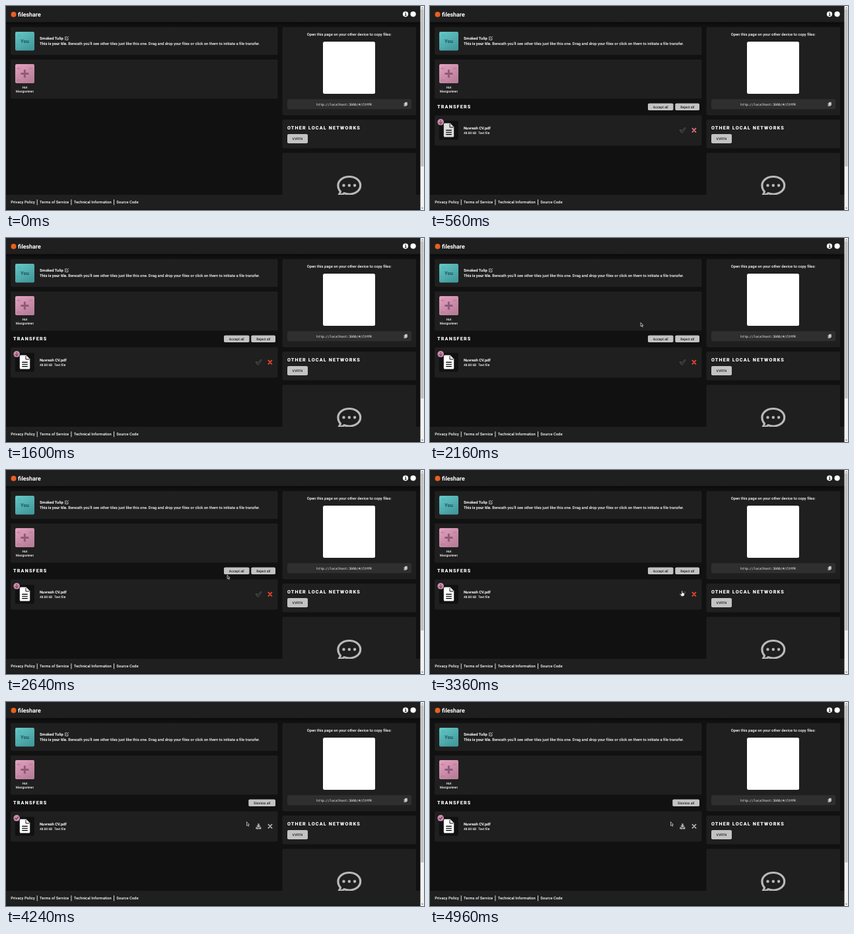
An HTML page that plays this animation: 633 px wide and 309 px high, repeating every 5.04 s.

```html
<!DOCTYPE html>
<html lang="en">
<head>
<meta charset="utf-8">
<title>File transfer</title>
<style>
html, body { margin: 0; width: 100%; height: 100%; overflow: hidden; background: #111; }
svg { display: block; width: 100vw; height: 100vh; }
text { font: 500 5.83px Roboto, sans-serif; fill: #fff; text-rendering: geometricPrecision; }
.b { font-weight: 700; }
.mid { text-anchor: middle; }
.small { font-size: 4.85px; }
.title { font-size: 8.9px; font-weight: 700; }
.head { font-size: 7.2px; font-weight: 900; letter-spacing: 1.18px; }
.btn { font-size: 5.1px; font-weight: 500; fill: #1c1c1c; text-anchor: middle; }
.mono { font: 4.8px "DejaVu Sans Mono", monospace; text-anchor: middle; }
.panel { fill: #1f1f1f; }
.key { fill: #c3c3c3; }
.line { fill: none; stroke-linecap: round; stroke-linejoin: round; }
</style>
</head>
<body>
<svg viewBox="0 0 633 309" preserveAspectRatio="none">
  <defs>
    <linearGradient id="teal" x2="0.6" y2="1"><stop stop-color="#66c9c8"/><stop offset="1" stop-color="#439a9d"/></linearGradient>
    <linearGradient id="pink" x2="0.6" y2="1"><stop stop-color="#e4a3c0"/><stop offset="1" stop-color="#b97e9a"/></linearGradient>
    <linearGradient id="shade" x2="0" y2="1"><stop stop-color="#090909"/><stop offset="1" stop-color="#111"/></linearGradient>
  </defs>

  <rect width="633" height="309" fill="#111"/>
  <rect y="24" width="628" height="6" fill="url(#shade)"/>
  <rect class="panel" width="628" height="24.5"/>
  <circle cx="11.5" cy="12.8" r="4" fill="#e8601f"/>
  <text class="title" x="18" y="15.7">fileshare</text>
  <circle cx="605" cy="12.3" r="4.1" fill="#fff"/>
  <path d="M604 11.6H605.5V14.4M603.8 14.5H606.4M605 9.4V10.4" stroke="#1f1f1f" fill="none"/>
  <circle cx="616.6" cy="12.3" r="4.1" fill="#fff"/>

  <rect class="panel" x="7" y="32" width="404.5" height="42" rx="2"/>
  <rect x="14" y="39" width="29" height="28.5" rx="2" fill="url(#teal)"/>
  <path d="M17 46q0-3 3-3t3 3zM35 45h5v2h-5zM16 60h6v3h-6z" fill="#4fb3b4" opacity=".6"/>
  <text class="b mid" x="28.5" y="55.8" style="font-size:7.6px;fill:#1d5a60">You</text>
  <text class="b" x="51" y="50.6">Smoked Tulip</text>
  <path class="line" d="M92 46.7H89.7V51.3H94V49M91.6 49.4L94.6 46.2" stroke="#ddd" stroke-width=".8"/>
  <text x="51" y="59"><tspan class="b">This is your tile.</tspan> Beneath you'll see other tiles just like this one. Drag and drop your files or click on them to initiate a file transfer.</text>

  <rect class="panel" x="7" y="81" width="404.5" height="59.5" rx="2"/>
  <rect x="14" y="88" width="29" height="29" rx="2" fill="url(#pink)"/>
  <path d="M16 96q0-3 3-3t4 3zM34 96q1-3 3-3t4 3zM16 111h6v3h-6z" fill="#b9789a" opacity=".5"/>
  <path d="M28.4 96.5V108.5M22.4 102.5H34.4" stroke="#92597a" stroke-width="3"/>
  <text class="small mid" x="28.4" y="124.8">Hot</text>
  <text class="small mid" x="28.4" y="131.4">Mangosteen</text>

  <g id="transfers">
    <text class="head" x="11" y="155.3">TRANSFERS</text>
    <g class="before">
      <rect class="key" x="330" y="147.5" width="38.5" height="10.6" rx="1.8"/>
      <text class="btn" x="349.2" y="154.7">Accept all</text>
      <rect class="key" x="371.3" y="147.5" width="36.7" height="10.6" rx="1.8"/>
      <text class="btn" x="389.7" y="154.7">Reject all</text>
    </g>
    <g class="after">
      <rect class="key" x="367.3" y="147.5" width="40.7" height="10.6" rx="1.8"/>
      <text class="btn" x="387.6" y="154.7">Dismiss all</text>
    </g>
    <rect class="panel" x="7" y="165.5" width="404.5" height="46" rx="2"/>
    <rect x="14" y="174" width="29" height="28.5" rx="2" fill="#111"/>
    <g id="doc">
      <path d="M22 177.5H30.5L36.2 183.2V197Q36.2 198.6 34.6 198.6H22.4Q20.8 198.6 20.8 197V179Q20.8 177.5 22 177.5Z" fill="#fff"/>
      <path d="M30 178.5V183.8H35.5" stroke="#111" fill="none"/>
      <path d="M24.2 188.3H32.8M24.2 191.4H32.8M24.2 194.5H32.8" stroke="#111" stroke-width="1.4"/>
    </g>
    <circle cx="16.2" cy="175.8" r="4.8" fill="#cd8fae"/>
    <path class="line before" d="M16.2 173V178.3M14 176.2L16.2 178.5L18.4 176.2" stroke="#84476a" stroke-width="1.2"/>
    <path class="line after" d="M13.9 176L15.6 177.7L18.6 174.2" stroke="#4f2a40" stroke-width="1.1"/>
    <text class="b" x="51" y="186.6">Nuvresh CV.pdf</text>
    <text class="small" x="51" y="194">48.80 kB</text>
    <text class="small" x="73" y="194">Text file</text>
    <g class="before line">
      <path d="M379.3 188.5L381.7 190.8L386 185.5" stroke="#6a6f68" stroke-width="2.6"/>
      <path d="M379.3 188.5L381.7 190.8L386 185.5" stroke="#1c221b" stroke-width="1.4"/>
      <path id="reject" d="M397.4 185.4L402.4 190.9M402.4 185.4L397.4 190.9" stroke-width="1.9"/>
    </g>
    <g class="after">
      <path d="M381.2 184.2H383.6V187.2H385.8L382.4 190.4L379 187.2H381.2ZM378.4 189.6H380.2L382.4 191.4L384.6 189.6H386.4V192.4H378.4Z" fill="#b0b0b0"/>
      <path class="line" d="M397.4 185.5L402.6 190.9M402.6 185.5L397.4 190.9" stroke="#b5b5b5" stroke-width="1.7"/>
    </g>
  </g>

  <rect class="panel" x="418.5" y="32" width="202.5" height="133.5" rx="2"/>
  <text class="mid" x="519.7" y="45.3">Open this page on your other device to copy files:</text>
  <rect x="480" y="54" width="79" height="79" rx="2.5" fill="#fff"/>
  <rect x="426" y="141.3" width="188" height="15" rx="2" fill="#2f2f2f"/>
  <text class="mono" x="512" y="150.6">http://localhost:3000/#/CVYPR</text>
  <rect x="602.5" y="147" width="3.8" height="5" rx=".6" fill="#999"/>
  <rect x="604" y="145.7" width="3.8" height="5" rx=".6" fill="#ccc"/>

  <rect class="panel" x="418.5" y="172" width="202.5" height="43.5" rx="2"/>
  <text class="head" x="426" y="187.3">OTHER LOCAL NETWORKS</text>
  <rect class="key" x="426" y="194" width="31" height="14" rx="2"/>
  <text class="btn" x="441.5" y="203">VVFFH</text>

  <rect class="panel" x="418.5" y="222.5" width="202.5" height="80" rx="2"/>
  <path class="line" d="M506.5 281Q502.9 277 502.9 271.7C502.9 264 510.5 258.5 519.8 258.5S536.7 264 536.7 271.7S529.1 285 519.8 285Q515.5 285 511.8 283.6Q508 286.8 503.5 287Q506 284.2 506.5 281Z" stroke="#b8b8b8" stroke-width="3.2"/>
  <g fill="#b8b8b8"><circle cx="511.5" cy="271.7" r="2.2"/><circle cx="519.8" cy="271.7" r="2.2"/><circle cx="528.1" cy="271.7" r="2.2"/></g>

  <rect class="panel" y="286" width="628" height="23"/>
  <rect y="307.8" width="628" height="1.2" fill="#111"/>
  <text x="7.3" y="299.3">Privacy Policy</text>
  <text x="51" y="299.3">Terms of Service</text>
  <text x="102.7" y="299.3">Technical Information</text>
  <text x="167.3" y="299.3">Source Code</text>
  <path d="M47.2 293V301.5M98.9 293V301.5M163.5 293V301.5" stroke="#f0f0f0" stroke-width=".9"/>

  <rect x="627.5" width="5.5" height="309" fill="#f1f1f1"/>
  <rect x="628.2" y="5" width="4.3" height="238" fill="#c1c1c1"/>
  <path d="M629 3.5L630.5 1.8L632 3.5ZM629 305.5L630.5 307.2L632 305.5Z" fill="#666"/>

  <g id="pointer">
    <path id="arrow" d="M0 0V5.8L1.4 4.6L2.3 6.8L3.2 6.4L2.3 4.3H4Z" fill="#222" stroke="#ddd" stroke-width=".7"/>
    <path id="hand" d="M-1.1 0H.2V3L3 3.7V6L2.2 8H-1.4L-3 5.2L-2.3 4.5L-1.1 5.2Z" fill="#fff" stroke="#333" stroke-width=".5"/>
  </g>
</svg>
<script>
const LOOP = 5040, STEP = 80;
const ARRIVE = 400, SETTLED = 720, SHOW = 2160, HOVER = 3040, ACCEPT = 4000, LEAVE = 4080;

// time, x, y of the pointer tip
const path = [
  [2160, 319, 128], [2240, 324, 140], [2560, 335, 159], [2640, 335, 159],
  [2800, 352, 178], [3040, 382, 183], [4000, 382.5, 183], [4160, 364.5, 181.5], [5040, 364.5, 181.5]
];

const $ = id => document.getElementById(id);
const group = name => document.querySelectorAll('.' + name);
const show = (el, on) => { el.style.display = on ? '' : 'none'; };
const before = group('before'), after = group('after');

function tip(t) {
  const i = Math.max(1, path.findIndex(p => p[0] >= t));
  const a = path[i - 1], b = path[i];
  const k = Math.max(0, (t - a[0]) / (b[0] - a[0]));
  return [1, 2].map(n => a[n] + (b[n] - a[n]) * k);
}

function draw(now) {
  const t = Math.floor(now % LOOP / STEP) * STEP;
  const done = t >= ACCEPT;
  const hand = t >= HOVER && t < LEAVE;

  show($('transfers'), t >= ARRIVE);
  before.forEach(el => show(el, !done));
  after.forEach(el => show(el, done));
  $('doc').style.opacity = t < SETTLED ? 0.86 : 1;
  $('reject').style.stroke = t < SETTLED ? '#df6c7a' : '#e5442f';

  show($('pointer'), t >= SHOW);
  show($('arrow'), !hand);
  show($('hand'), hand);
  $('pointer').setAttribute('transform', `translate(${tip(t)})`);
}

const start = performance.now();
function tick() {
  draw(performance.now() - start);
  requestAnimationFrame(tick);
}
tick();
</script>
</body>
</html>
```
